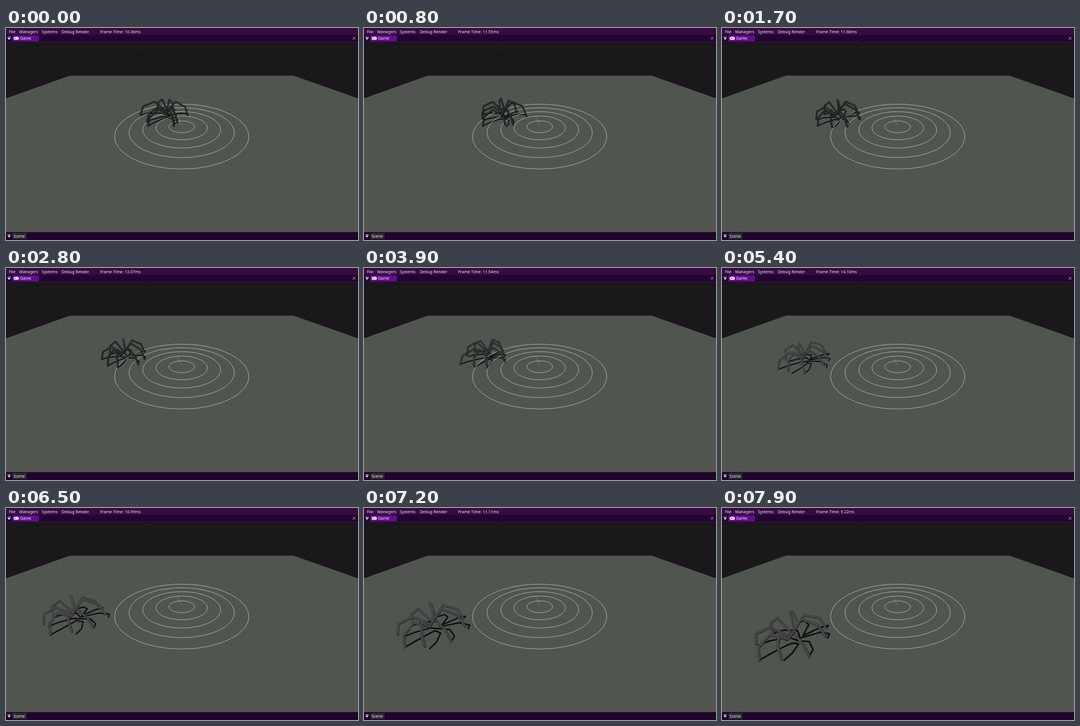
Animation, 600 px wide and 363 px high, one loop 8000 ms. Source, as an HTML page with a canvas:

```html
<!DOCTYPE html>
<html lang="en">
<head>
<meta charset="utf-8">
<title>Spider walk</title>
<style>
  html, body { margin: 0; width: 100%; height: 100%; overflow: hidden; background: #1a181b; }
  canvas { position: absolute; left: 0; top: 0; width: 600px; height: 363px; }
  span { position: absolute; font: 6.9px/10px "Noto Sans", "Open Sans", sans-serif; color: #f0edf2; white-space: pre; }
</style>
</head>
<body>
<canvas id="stage"></canvas>
<span style="left:5px;top:1.5px">File</span>
<span style="left:22.5px;top:1.5px">Managers</span>
<span style="left:61px;top:1.5px">Systems</span>
<span style="left:95px;top:1.5px">Debug Render</span>
<span style="left:160.5px;top:1.5px" id="time"></span>
<span style="left:24px;top:13.3px">Game</span>
<span style="left:13px;top:351.5px">Scene</span>
<script>
const W = 600, H = 363, LOOP = 8000, STEP = 100;
const canvas = document.getElementById("stage");
const label = document.getElementById("time");
const ctx = canvas.getContext("2d");
const dpr = window.devicePixelRatio || 1;
canvas.width = W * dpr;
canvas.height = H * dpr;
ctx.scale(dpr, dpr);

// Camera over the ground plane
const CX = 299.5, CY = 187, HORIZON = 10, GROUND = 2512, SPREAD = 344.4, FAR = 15.85;
const SIN = (CY - HORIZON) / SPREAD, COS = Math.sqrt(1 - SIN * SIN);
const FOCAL = SPREAD * COS, EYE = GROUND * COS / SPREAD, BACK = FAR - EYE * SIN / COS;

function project([x, s, h = 0]) {
  const d = BACK - s, e = EYE - h;
  const w = d * COS + e * SIN;
  return [CX + FOCAL * x / w, CY + FOCAL * (e * COS - d * SIN) / w, FOCAL / w];
}
function toGround(x, y) {
  const d = GROUND / (y - HORIZON);
  return [(x - CX) * d / SPREAD, FAR - d];
}

// Walk: where the body stands on screen, how far it has turned (degrees), frame cost
const walk = [
  { t: 0,    x: 274, y: 156, turn: 0,   ms: 10.36 },
  { t: 1700, x: 193, y: 159, turn: -22, ms: 11.66 },
  { t: 2800, x: 198, y: 157, turn: -20, ms: 13.07 },
  { t: 3900, x: 211, y: 158, turn: 5,   ms: 11.54 },
  { t: 5400, x: 140, y: 164, turn: 4,   ms: 14.10 },
  { t: 6500, x: 114, y: 196, turn: 0,   ms: 10.99 },
  { t: 7900, x: 116, y: 236, turn: -12, ms: 9.22 }
];

const clamp = v => Math.max(0, Math.min(1, v));
const ease = v => v * v * (3 - 2 * v);
const mix = (a, b, q) => a + (b - a) * q;
const mixAll = (a, b, q) => a.map((v, i) => mix(v, b[i], q));
const dist = (a, b) => Math.hypot(a[0] - b[0], a[1] - b[1]);
const gray = v => `rgb(${v},${v + 3},${v})`;
const noise = n => { const v = Math.sin(n * 12.9898 + 4.1) * 43758.5453; return v - Math.floor(v); };

function walkAt(t) {
  t = Math.max(0, Math.min(7900, t));
  const i = Math.max(1, walk.findIndex(k => k.t >= t));
  const a = walk[i - 1], b = walk[i], q = (t - a.t) / (b.t - a.t);
  const wobble = q > 0 && q < 1 ? (noise(t / STEP) - 0.5) * 3 : 0;
  return {
    root: mixAll(toGround(a.x, a.y), toGround(b.x, b.y), q),
    turn: mix(a.turn, b.turn, q),
    ms: mix(a.ms, b.ms, q) + wobble
  };
}

// Resting place of foot j (front to back) on one side
function restAt(side, j, t) {
  const { root, turn } = walkAt(t);
  const a = (side * (24 + 42 * j) + turn) * Math.PI / 180;
  const r = 1.6 + 0.15 * j;
  return [root[0] + r * Math.sin(a), root[1] + r * Math.cos(a) - 0.2];
}

// A foot stays planted for half a cycle, then swings to its next rest
function footAt(side, j, t) {
  const cycle = 700, phase = (j + (side > 0)) % 2 / 2;
  const c = t / cycle + phase, k = Math.floor(c);
  const plant = (k - phase + 0.4) * cycle;
  const a = restAt(side, j, plant), b = restAt(side, j, plant + cycle);
  const s = clamp((c - k) * 2 - 1);
  return [...mixAll(a, b, ease(s)), Math.sin(Math.PI * s) * 0.3 * Math.min(1, dist(a, b))];
}

function legPoints(hip, foot, j) {
  const knee = j > 1 ? 1.35 : 1.1;
  const at = (q, up) => [mix(hip[0], foot[0], q), mix(hip[1], foot[1], q), up + foot[2] * q];
  return [hip, at(0.42, knee), at(0.86, knee * 0.62), foot];
}

function line(pts, color, width, dx = 0, dy = 0) {
  ctx.strokeStyle = color;
  ctx.lineWidth = width;
  ctx.beginPath();
  pts.forEach(([x, y], i) => i ? ctx.lineTo(x + dx, y + dy) : ctx.moveTo(x + dx, y + dy));
  ctx.stroke();
}
function shape(color, ...pts) {
  ctx.fillStyle = color;
  ctx.beginPath();
  for (let i = 0; i < pts.length; i += 2) ctx.lineTo(pts[i], pts[i + 1]);
  ctx.fill();
}
function box(color, x, y, w, h) {
  ctx.fillStyle = color;
  ctx.fillRect(x, y, w, h);
}

function drawRings() {
  for (let r = 1; r <= 5; r++) {
    const pts = [];
    for (let i = 0; i <= 40; i++) {
      const a = i * Math.PI / 20;
      pts.push(project([r * Math.cos(a), r * Math.sin(a)]));
    }
    line(pts, "rgba(222,226,216,.75)", 0.8);
  }
}

function drawSpider(t) {
  const { root, turn } = walkAt(t);
  const a = turn * Math.PI / 180;
  const front = [...root, 0.45];
  const tail = [root[0] - 0.6 * Math.sin(a), root[1] - 0.6 * Math.cos(a), 0.6];
  const legs = [];
  for (const side of [-1, 1])
    for (let j = 0; j < 4; j++)
      legs.push(legPoints(mixAll(front, tail, j / 3), footAt(side, j, t), j));
  const lit = ease(clamp((t - 2500) / 3300));
  const dark = Math.round(mix(20, 43, lit)), light = Math.round(mix(43, 70, lit));

  ctx.lineCap = ctx.lineJoin = "round";
  for (const leg of legs) {
    const shade = leg.map(([x, s, h]) => project([x + h * 0.25, s - h * 0.55]));
    line(shade, "#0c0f0c", shade[0][2] * 0.09);
  }
  drawRings();
  legs.sort((m, n) => m[3][1] - n[3][1]);
  for (const leg of legs) {
    const pts = leg.map(project), w = pts[2][2] * 0.15;
    line(pts, gray(dark), w);
    line(pts, gray(light), w * 0.65, -w * 0.12, -w * 0.12);
  }
  const core = [project(front), project(tail)];
  line(core, gray(dark), core[0][2] * 0.2);
  line(core, gray(light), core[0][2] * 0.1, -0.5, -0.5);
  ctx.lineCap = "butt";
}

function menuMark(y) {
  box("#eeeaf0", 2.5, y, 5.5, 0.9);
  shape("#eeeaf0", 2.5, y + 2, 8, y + 2, 5.25, y + 5.3);
}

function drawPanels() {
  box("#3a0a41", 0, 0, W, 12);
  box("#210430", 0, 12, W, 12);
  box("#650b8f", 11, 12.5, 45, 10.5);
  box("#490a66", 0, 22.8, W, 0.8);
  box("#1e0529", 0, 349.5, W, 13.5);
  box("#3b204a", 0, 349.3, W, 0.7);
  box("#2d2a32", 11, 351, 24, 10.5);
  menuMark(15);
  menuMark(353.5);

  // Gamepad
  ctx.fillStyle = "#f0edf2";
  ctx.beginPath();
  ctx.roundRect(13, 15, 9, 5.2, 2.5);
  ctx.fill();
  box("#650b8f", 14.6, 17.1, 2.4, 0.7);
  box("#650b8f", 15.45, 16.25, 0.7, 2.4);
  box("#650b8f", 18.4, 17.7, 0.9, 0.9);
  box("#650b8f", 19.8, 16.4, 0.9, 0.9);

  line([[591, 15.3], [595.6, 19.9]], "#e6e0ea", 0.8);
  line([[595.6, 15.3], [591, 19.9]], "#e6e0ea", 0.8);
}

// Distant specks drifting in an arc
function drawSpecks(p) {
  const x = 225 + 7 * p + 11.5 * Math.sin(Math.PI * p);
  const y = 28 + 11 * (1 - p) ** 1.6;
  box("#5f665f", x - 0.5, y - 0.5, 1, 1);
  if (p < 0.25) box("#5f665f", x + 6, y - 3, 1, 1);
}

function draw(now) {
  const t = Math.floor((now % LOOP) / STEP) * STEP;
  box("#1a181b", 0, 0, W, H);
  shape("#505550", 109, 81.5, 490, 81.5, 600, 120.5, 600, 350, 0, 350, 0, 120.5);
  drawSpecks(t / LOOP);
  line([[292, 151], [299.5, 167.5]], "#33a03f", 1);
  drawSpider(t);
  drawPanels();

  const text = `Frame Time: ${walkAt(t).ms.toFixed(2)}ms`;
  if (label.textContent !== text) label.textContent = text;
}

const start = performance.now();
function tick() {
  draw(performance.now() - start);
  requestAnimationFrame(tick);
}
tick();
</script>
</body>
</html>
```
